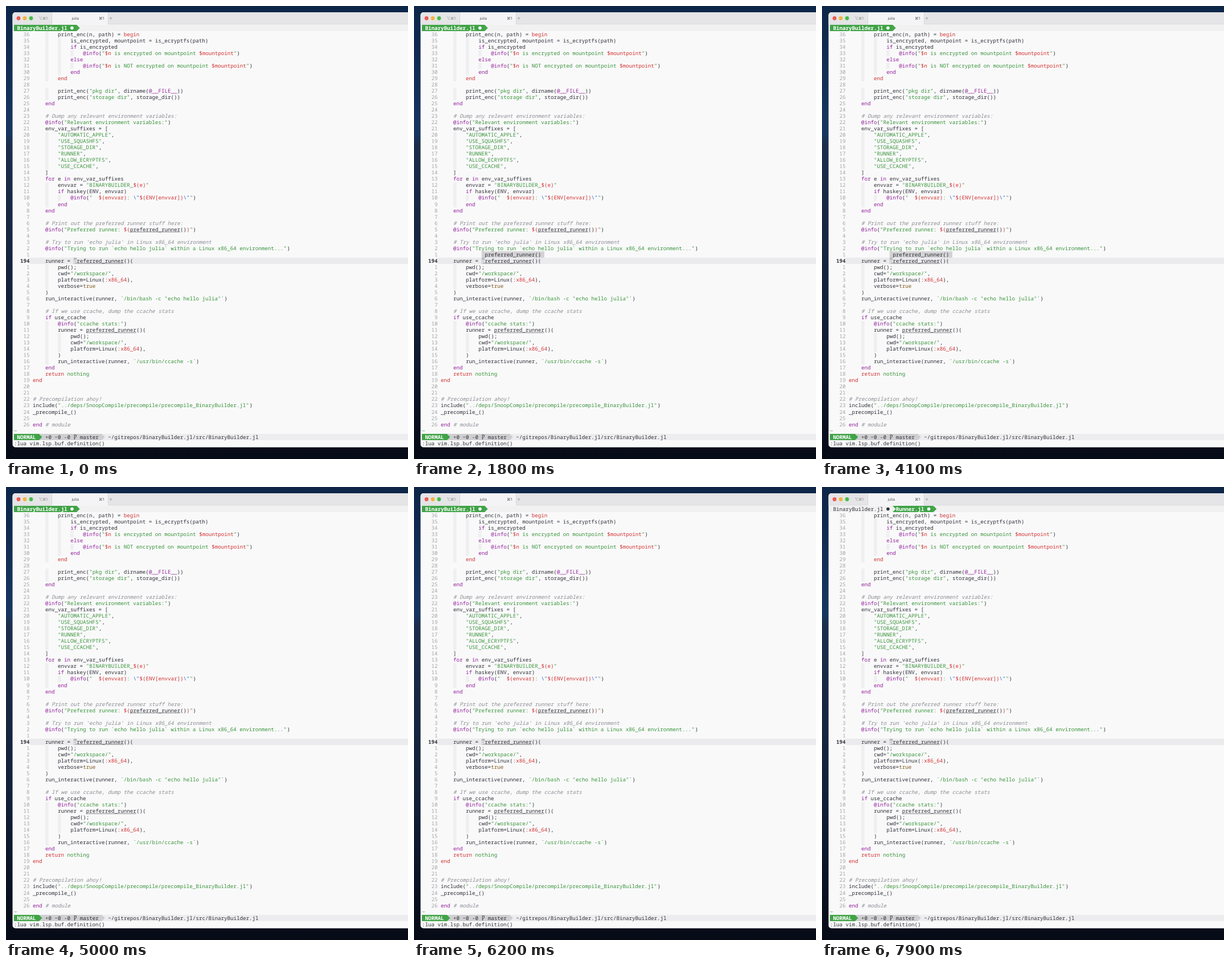
Write an HTML page that moves like this. It is 706 by 794 pixels and loops after 8 s.

```html
<!DOCTYPE html>
<html lang="en">
<head>
<meta charset="utf-8">
<title>Editor hover</title>
<style>
  html, body { margin: 0; width: 100%; height: 100%; overflow: hidden; background: #0c1a33; }
  svg { display: block; width: 706px; height: 794px; }
  text {
    font: 9.188px "Noto Sans Mono", "DejaVu Sans Mono", monospace;
    white-space: pre; text-rendering: geometricPrecision; fill: #303138;
  }
  .ui { font: 6.6px Inter, "DejaVu Sans", sans-serif; fill: #555; }
  .num { fill: #a3a4a9; }
  .bold { font-weight: 700; }
  .white { fill: #fff; }
  .kw { fill: #93219a; }
  .str { fill: #399439; }
  .red { fill: #d2322f; }
  .esc { fill: #2f62c9; }
  .lit { fill: #80591c; }
  .com { fill: #8c8d93; font-style: italic; }
  .green { fill: #40a347; }
  .tabs-one, .tabs-two, .popup { animation: 8s step-end infinite; }
  .tabs-one { animation-name: first-tab; }
  .tabs-two { animation-name: second-tab; }
  .popup { animation-name: hover; }
  @keyframes first-tab { 0% { opacity: 1 } 96.25%, 100% { opacity: 0 } }
  @keyframes second-tab { 0% { opacity: 0 } 96.25%, 100% { opacity: 1 } }
  @keyframes hover { 0% { opacity: 0 } 21.25% { opacity: 1 } 62.5%, 100% { opacity: 0 } }
</style>
</head>
<body>
<svg viewBox="0 0 706 794">
  <defs>
    <linearGradient id="sky" x2="0" y2="1">
      <stop offset="0" stop-color="#0d2648"/>
      <stop offset=".28" stop-color="#173660"/>
      <stop offset=".31" stop-color="#1c2d4b"/>
      <stop offset=".7" stop-color="#121f38"/>
      <stop offset="1" stop-color="#060b16"/>
    </linearGradient>
    <clipPath id="frame"><rect x="11.5" y="11" width="720" height="762.5" rx="5"/></clipPath>
  </defs>
  <rect width="706" height="794" fill="url(#sky)"/>
  <g clip-path="url(#frame)">
    <rect x="11" y="11" width="695" height="763" fill="#f9f9fa"/>
    <rect x="11" y="11" width="695" height="21" fill="#e5e4e6"/>
    <rect x="81" y="11" width="98" height="21.5" fill="#f4f3f5"/>
    <path d="M80.5 11v21M179.5 11v21M11 32h69M180 32h526" stroke="#d2d1d3" stroke-width=".7"/>
    <circle cx="22" cy="21.5" r="3.4" fill="#ee5a52"/>
    <circle cx="33" cy="21.5" r="3.4" fill="#f0b63c"/>
    <circle cx="44" cy="21.5" r="3.4" fill="#45bd45"/>
    <text class="ui" x="57" y="23.8" style="fill:#888">⌥⌘1</text>
    <text class="ui" x="115.5" y="23.8">julia</text>
    <text class="ui" x="163" y="23.8">⌘1</text>
    <path d="M181.5 21.5h5M184 19v5" stroke="#999" stroke-width=".7"/>
    <g id="screen"></g>
  </g>
</svg>
<script>
const source = String.raw`
        print_enc(n, path) = begin
            is_encrypted, mountpoint = is_ecryptfs(path)
            if is_encrypted
                @info("$n is encrypted on mountpoint $mountpoint")
            else
                @info("$n is NOT encrypted on mountpoint $mountpoint")
            end
        end

        print_enc("pkg dir", dirname(@__FILE__))
        print_enc("storage dir", storage_dir())
    end

    # Dump any relevant environment variables:
    @info("Relevant environment variables:")
    env_var_suffixes = [
        "AUTOMATIC_APPLE",
        "USE_SQUASHFS",
        "STORAGE_DIR",
        "RUNNER",
        "ALLOW_ECRYPTFS",
        "USE_CCACHE",
    ]
    for e in env_var_suffixes
        envvar = "BINARYBUILDER_$(e)"
        if haskey(ENV, envvar)
            @info("  $(envvar): \"$(ENV[envvar])\"")
        end
    end

    # Print out the preferred runner stuff here:
    @info("Preferred runner: $(preferred_runner())")

    # Try to run 'echo julia' in Linux x86_64 environment
    @info("Trying to run ´echo hello julia´ within a Linux x86_64 environment...")

    runner = preferred_runner()(
        pwd();
        cwd="/workspace/",
        platform=Linux(:x86_64),
        verbose=true
    )
    run_interactive(runner, ´/bin/bash -c "echo hello julia"´)

    # If we use ccache, dump the ccache stats
    if use_ccache
        @info("ccache stats:")
        runner = preferred_runner()(
            pwd();
            cwd="/workspace/",
            platform=Linux(:x86_64),
        )
        run_interactive(runner, ´/usr/bin/ccache -s´)
    end
    return nothing
end


# Precompilation ahoy!
include("../deps/SnoopCompile/precompile/precompile_BinaryBuilder.jl")
_precompile_()

end # module`.slice(1).replace(/´/g, "`").split("\n");

const CELL = 5.513, LINE = 11.03, LEFT = 13.9, TOP = 44, GUTTER = 6;
const CURRENT = 36, STATUS = 64;
const RED_ENDS = [7, 55];
const CODE = /#.*$|`[^`]*`|"(?:\\.|[^"\\])*"|@\w+|:x86_64|preferred_runner|\b(?:if|else|end|for|in|begin|return|nothing|true)\b/g;
const INNER = /\\"|\$\w+|\$\([\w[\]]+\)|\$\(|preferred_runner|\(\)|\)/g;

const colX = col => LEFT + col * CELL;
const rowY = row => TOP + row * LINE;
const escapeText = s => s.replace(/&/g, "&amp;").replace(/</g, "&lt;");

function label(col, row, str, cls = "") {
  const pad = str.length - str.trimStart().length;
  if (pad === str.length) return "";
  return `<text class="${cls}" x="${colX(col + pad)}" y="${rowY(row) + 8.7}">${escapeText(str.trim())}</text>`;
}

const box = (col, row, cols, fill) =>
  `<rect x="${colX(col)}" y="${rowY(row)}" width="${cols * CELL}" height="${LINE}" fill="${fill}"/>`;

const arrow = (col, row, fill) =>
  `<path d="M${colX(col) - .1} ${rowY(row)}l${CELL} ${LINE / 2}l${-CELL} ${LINE / 2}z" fill="${fill}"/>`;

const dot = (col, fill) =>
  `<circle cx="${colX(col) + CELL / 2}" cy="${rowY(-1) + 5.6}" r="2.8" fill="${fill}"/>`;

// Splits a string into [text, class, offset] pieces around the pattern's matches.
function split(str, pattern, base, classify) {
  const out = [];
  let last = 0;
  for (const m of str.matchAll(pattern)) {
    out.push([str.slice(last, m.index), base, last], [m[0], classify(m[0]), m.index]);
    last = m.index + m[0].length;
  }
  out.push([str.slice(last), base, last]);
  return out;
}

function innerClass(t) {
  if (t === '\\"') return "esc";
  return t === "()" || t === "preferred_runner" ? "" : "red";
}

function codeClass(t, row) {
  if (t[0] === "#") return "com";
  if (t[0] === '"' || t[0] === "`" || t === "nothing") return "str";
  if (t === "preferred_runner") return "";
  if (t === "true") return "lit";
  if (t[0] === ":" || /begin|return/.test(t) || (t === "end" && RED_ENDS.includes(row))) return "red";
  return "kw";
}

function drawToken(str, cls, col, row) {
  let out = label(col, row, str, cls);
  if (str === "preferred_runner") {
    const y = rowY(row) + 10.2;
    out += `<path d="M${colX(col)} ${y}H${colX(col + str.length)}" stroke="#55565c" stroke-width=".7"/>`;
  }
  return out;
}

function drawLine(str, row) {
  const indent = str.search(/\S/);
  let out = "";
  for (let c = 4; c < indent; c += 4) out += box(GUTTER + c, row, 1, "#efeff1");
  for (const [text, cls, at] of split(str, CODE, "", t => codeClass(t, row))) {
    const parts = text[0] === '"' ? split(text, INNER, "str", innerClass) : [[text, cls, 0]];
    for (const [s, c, offset] of parts) out += drawToken(s, c, GUTTER + at + offset, row);
  }
  const num = row === CURRENT ? "194" : String(Math.abs(row - CURRENT));
  return out + label(5 - num.length, row, num, row === CURRENT ? "bold" : "num");
}

const GREEN = "#40a347", BAR = "#ededef", MID = "#cfcfd2", INK = "#303138";

function tabs() {
  const name = "BinaryBuilder.jl";
  return box(0, -1, 130, "#f1f1f2") +
    `<g class="tabs-one">${box(0, -1, 20, GREEN)}${arrow(20, -1, GREEN)}
      ${label(1, -1, name, "white bold")}${dot(18, "#fff")}</g>
     <g class="tabs-two">${label(1, -1, name)}${dot(18, INK)}
      ${box(20, -1, 13, GREEN)}${arrow(20, -1, "#f1f1f2")}${arrow(33, -1, GREEN)}
      ${label(21, -1, "Runner.jl", "white bold")}${dot(31, "#fff")}</g>`;
}

function statusBar() {
  const x = colX(19) + 1.6, y = rowY(STATUS);
  return box(0, STATUS, 130, BAR) + box(8, STATUS, 20, MID) + arrow(28, STATUS, MID) +
    box(0, STATUS, 8, GREEN) + arrow(8, STATUS, GREEN) +
    label(1, STATUS, "NORMAL", "white bold") + label(10, STATUS, "+0 ~0 -0") +
    `<path d="M${x} ${y + 1}v9M${x} ${y + 8}l3 -3v-3h-2" fill="none" stroke="${INK}" stroke-width=".9"/>` +
    label(21, STATUS, "master") +
    label(30, STATUS, "~/gitrepos/BinaryBuilder.jl/src/BinaryBuilder.jl");
}

const cursorCol = GUTTER + 13;
document.getElementById("screen").innerHTML =
  tabs() +
  box(5, CURRENT, 125, "#ebebed") +
  source.map(drawLine).join("") +
  box(cursorCol, CURRENT, 1, "#bcbdc1") + label(cursorCol, CURRENT, "p", "white") +
  label(0, 63, "~", "str") +
  statusBar() +
  label(0, STATUS + 1, ":lua vim.lsp.buf.definition()") +
  `<g class="popup">${box(cursorCol, CURRENT - 1, 20, "#d3d3d5")}
    ${label(cursorCol + 1, CURRENT - 1, "preferred_runner()")}</g>`;
</script>
</body>
</html>
```
